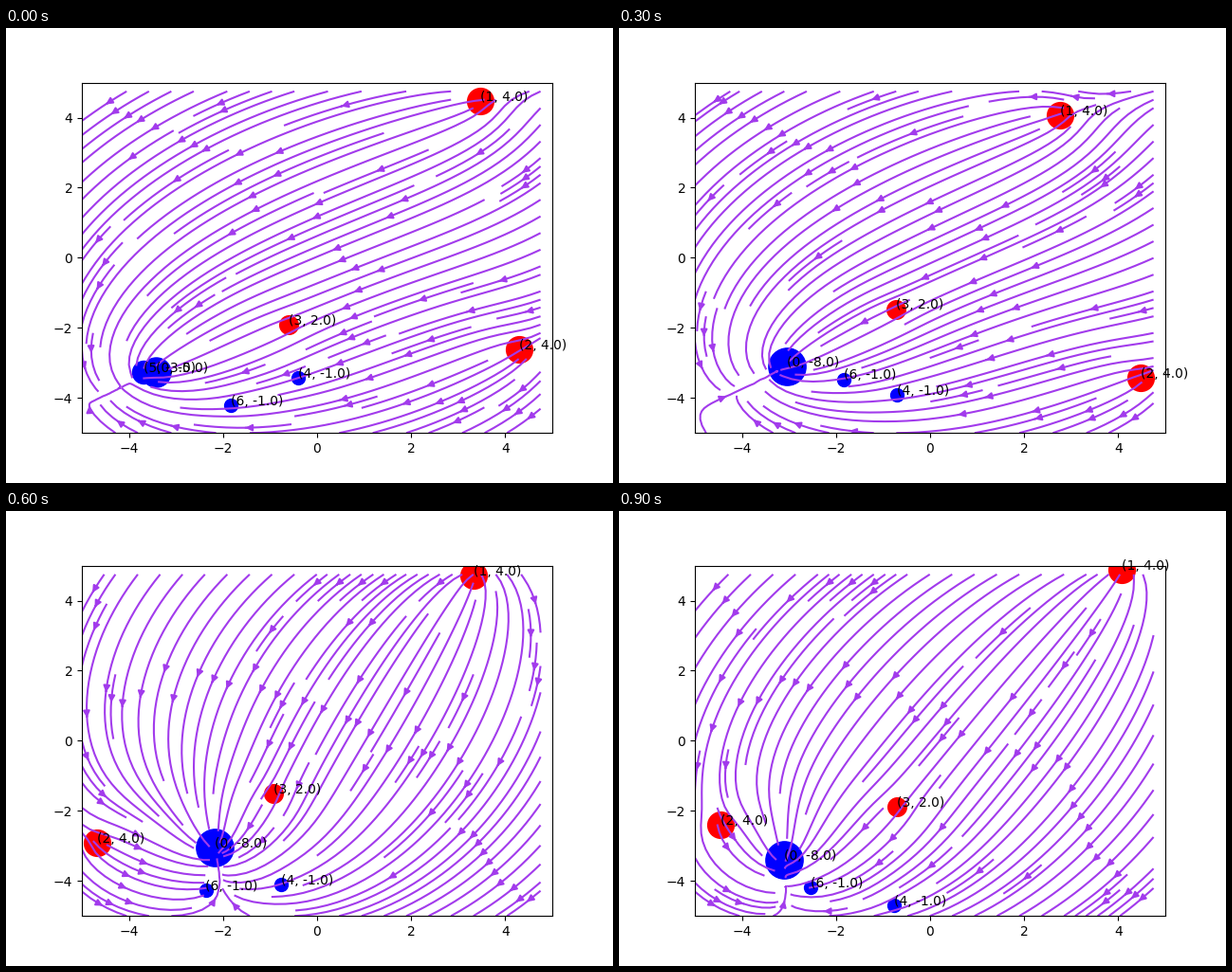
A matplotlib script that plays this animation: 640 by 480 pixels, repeating every 1000 ms.

```python
import matplotlib.pyplot as plt
import numpy as np
from matplotlib.animation import FuncAnimation

FRAMES, INTERVAL = 10, 100
KEY_STEPS = [0, 2, 3, 4, 5, 7, 9]

# Drifting charges: index -> (charge, stage pixels at each key step)
CHARGES = {
    0: (-8.0, [(158, 363), (171, 361), (177, 357), (207, 347),
               (227, 352.5), (212, 358), (174, 368)]),
    1: (4.0, [(499.5, 77), (474, 82), (465, 91.5), (481.5, 88),
              (489.5, 69.5), (496.5, 65.5), (530, 61.5)]),
    2: (4.0, [(541, 339), (544, 356.5), (550, 368.5), (573, 364),
              (81, 358), (111.5, 342), (107, 331)]),
    3: (2.0, [(298, 313), (299.5, 285.5), (292, 296.5), (271, 294),
              (274, 298), (289, 297), (293, 311.5)]),
    4: (-1.0, [(308, 369), (297, 361), (293, 387), (279, 385.5),
               (288, 393.5), (292, 393.5), (290, 415.5)]),
    6: (-1.0, [(237, 398), (224, 377), (237, 370.5), (238, 377),
               (220, 391), (201, 409.5), (202, 397)]),
}


def to_data(px, py):
    return (px - 80) / 49.6 - 5, 5 - (py - 57.6) / 36.96


def charges_at(step):
    """List of (index, charge, x, y) for one time step."""
    result = []
    for index, (charge, path) in CHARGES.items():
        px, py = (np.interp(step, KEY_STEPS, axis) for axis in zip(*path))
        result.append((index, charge, *to_data(px, py)))
    if step == 0:  # charges 0 and 5 have not merged yet
        result[0] = (0, -5.0, *result[0][2:])
        result.append((5, -3.0, *to_data(145, 363)))
    return result


def field(charges):
    """Each charge pushes with constant strength, whatever the distance."""
    ex, ey = np.zeros_like(X), np.zeros_like(Y)
    for _, charge, x, y in charges:
        dist = np.hypot(X - x, Y - y) + 1e-9
        ex += charge * (X - x) / dist
        ey += charge * (Y - y) / dist
    return ex, ey


def draw_step(step):
    """Draw one time step and return the artists it added."""
    before = set(ax.get_children())
    charges = charges_at(step)
    ax.streamplot(X, Y, *field(charges), density=1.4, color="#A23BEC")
    for index, charge, x, y in charges:
        ax.scatter(x, y, s=100 * abs(charge), c="red" if charge > 0 else "blue")
        ax.text(x, y, f"({index}, {charge})")
    ax.set(xlim=(-5, 5), ylim=(-5, 5))
    return [artist for artist in ax.get_children() if artist not in before]


def update(step):
    for i, group in enumerate(groups):
        for artist in group:
            artist.set_visible(i == step)


ticks = np.arange(-5, 5, 0.25)
X, Y = np.meshgrid(ticks, ticks)

fig, ax = plt.subplots(figsize=(6.4, 4.8), dpi=100)
ax.set(xlim=(-5, 5), ylim=(-5, 5))
groups = [draw_step(step) for step in range(FRAMES)]
update(0)

anim = FuncAnimation(fig, update, frames=FRAMES, interval=INTERVAL,
                     init_func=lambda: update(0), repeat=True, repeat_delay=0)
plt.show()
```
